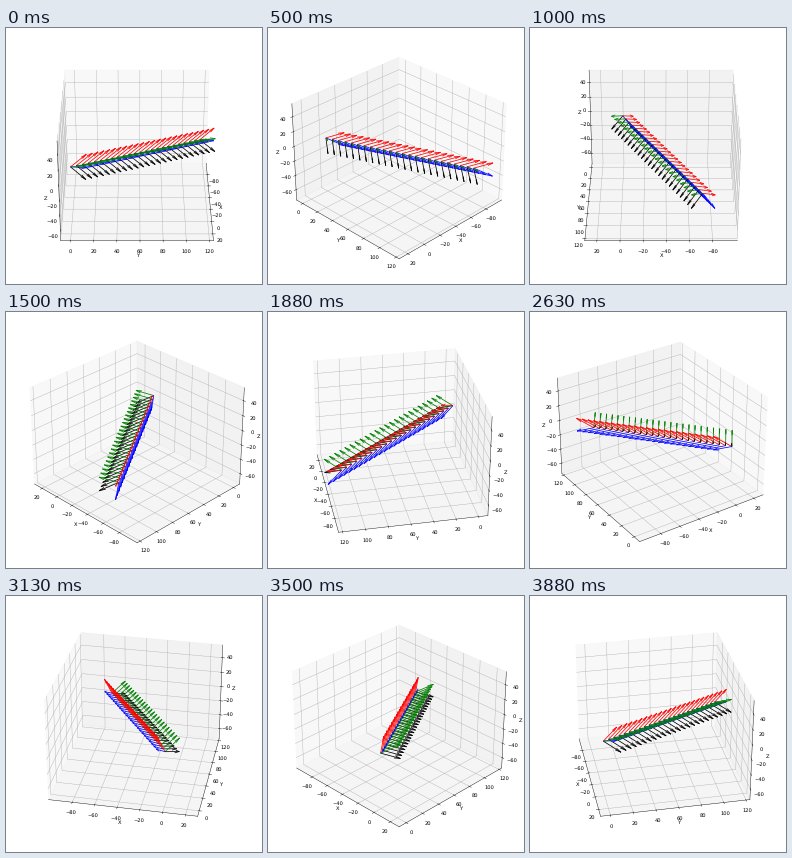
A matplotlib script that plays this animation: 256 by 256 pixels, repeating every 4.01 s.

```python
import matplotlib.pyplot as plt
import numpy as np
from matplotlib.animation import FuncAnimation

SIZE_PX = 256
SIZE_IN = 7
LOOP_MS = 4010
VIEWS = 32
FRAMES = 2 * VIEWS

plt.rcParams["font.family"] = "DejaVu Sans"
plt.rcParams["text.hinting"] = "none"

# Camera centres move in a straight line; each one casts four corner rays.
START = np.array([0.0, 0.0, 0.0])
END = np.array([-71.0, 115.0, -17.5])
POSES = 24
RAYS = {
    "red": (-10, 13.5, 9),
    "green": (10, 13.5, 9),
    "blue": (-10, 13.5, -9),
    "black": (10, 13.5, -9),
}
HALF_RANGE = 66

fig = plt.figure(figsize=(SIZE_IN, SIZE_IN), dpi=SIZE_PX / SIZE_IN)
ax = fig.add_subplot(projection="3d")
fig.subplots_adjust(left=0.05, right=0.95, bottom=0.05, top=0.95)

for centre in np.linspace(START, END, POSES):
    for color, ray in RAYS.items():
        ax.quiver(*centre, *ray, color=color, linewidth=1.5)

middle = (START + END) / 2
ax.set_xlim(middle[0] - HALF_RANGE, middle[0] + HALF_RANGE)
ax.set_ylim(middle[1] - HALF_RANGE, middle[1] + HALF_RANGE)
ax.set_zlim(middle[2] - HALF_RANGE, middle[2] + HALF_RANGE)
ax.set_xticks(range(-80, 21, 20))
ax.set_yticks(range(0, 121, 20))
ax.set_zticks(range(-60, 41, 20))
ax.tick_params(pad=3)
ax.set_xlabel("X", labelpad=-2)
ax.set_ylabel("Y", labelpad=-2)
ax.set_zlabel("Z", labelpad=-2)


def update(frame):
    # Half-steps keep each hard turn on time although the last view lasts longer.
    view = min((frame + 1) // 2, VIEWS - 1)
    # A tiny offset settles which edges carry the axes in face-on views.
    nudge = -0.01 if view else 0.01
    ax.view_init(elev=30, azim=360 * view / VIEWS + nudge)
    return []


animation = FuncAnimation(
    fig, update, frames=FRAMES, interval=LOOP_MS / FRAMES,
    init_func=lambda: update(0), repeat=True, repeat_delay=0,
)
plt.show()
```
